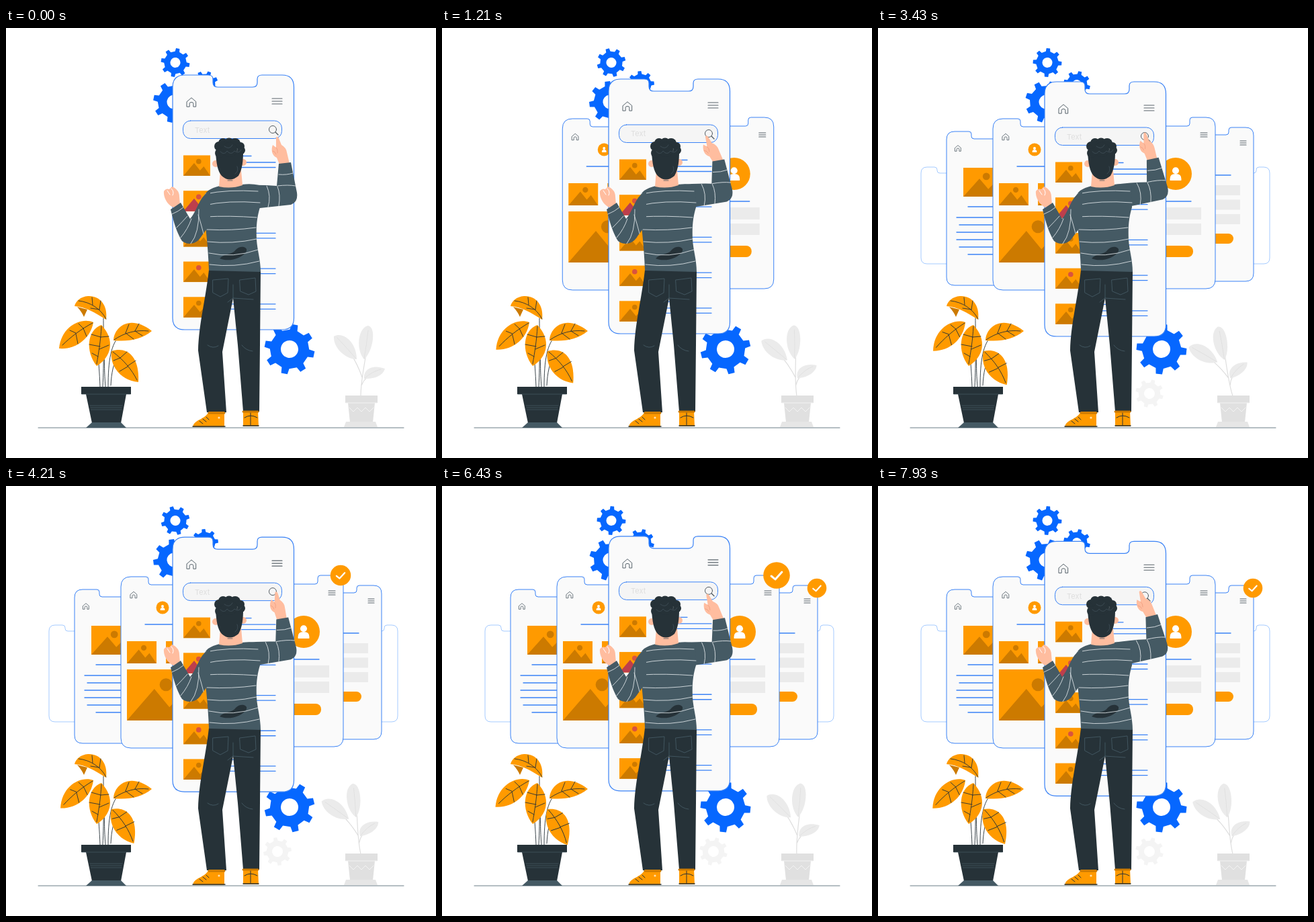
Recreate the animation shown at these times as an HTML page. Size 640 by 640 pixels, loop 8000 ms.

```html
<!DOCTYPE html>
<html lang="en">
<head>
<meta charset="utf-8">
<title>App design</title>
<style>
  html, body { margin: 0; width: 100%; height: 100%; overflow: hidden; background: #fff; }
  svg { display: block; width: 100vw; height: 100vh; }
</style>
</head>
<body>
<svg id="stage" viewBox="0 0 640 640" stroke-linecap="round" stroke-linejoin="round"></svg>
<script>
const LOOP = 8000;
const BLUE = '#0667ff', LINE = '#3a82f6', ORANGE = '#ff9a00', BROWN = '#cc7a00';
const DARK = '#263238', SLATE = '#455a64', SKIN = '#ffbd9f', PAPER = '#fafafa', GRAY = '#ebebeb';

const path = (d, fill = 'none', stroke = 'none', width = 1) =>
  `<path d="${d}" fill="${fill}" stroke="${stroke}" stroke-width="${width}"/>`;
const rect = (x, y, w, h, fill, r = 0, stroke = 'none') =>
  `<rect x="${x}" y="${y}" width="${w}" height="${h}" rx="${r}" fill="${fill}" stroke="${stroke}"/>`;
const circle = (x, y, r, fill, stroke = 'none') =>
  `<circle cx="${x}" cy="${y}" r="${r}" fill="${fill}" stroke="${stroke}"/>`;
const group = (id, ...parts) => `<g id="${id}">${parts.join('')}</g>`;
const rule = (x1, x2, y) => path(`M${x1} ${y}H${x2}`, 'none', LINE, 1.3);

function gear(id, x, y, r, fill, hole) {
  const points = [];
  for (let i = 0; i < 8; i++) {
    for (const [turn, reach] of [[-.25, .78], [-.16, 1], [.16, 1], [.25, .78]]) {
      const a = (i + turn) * Math.PI / 4;
      points.push(`${(Math.cos(a) * r * reach).toFixed(2)} ${(Math.sin(a) * r * reach).toFixed(2)}`);
    }
  }
  const ring = `M${hole} 0A${hole} ${hole} 0 1 0 ${-hole} 0A${hole} ${hole} 0 1 0 ${hole} 0Z`;
  return `<g transform="translate(${x} ${y})"><path id="${id}" fill-rule="evenodd" fill="${fill}" d="M${points.join('L')}Z${ring}"/></g>`;
}

function picture(x, y, w, h, hill = BROWN, sun = BROWN) {
  const at = (u, v) => `${x + w * u} ${y + h * v}`;
  return rect(x, y, w, h, ORANGE) +
    path(`M${at(0, 1)}L${at(.4, .38)}L${at(.62, .74)}L${at(.76, .54)}L${at(1, 1)}Z`, hill) +
    circle(x + w * .57, y + h * .3, h * .125, sun);
}

const house = (x, y, k) => path(
  `M${x - 7 * k} ${y - k}L${x} ${y - 7 * k}L${x + 7 * k} ${y - k}V${y + 7 * k}H${x + 3 * k}v${-5 * k}q0 ${-2 * k} ${-3 * k} ${-2 * k}t${-3 * k} ${2 * k}v${5 * k}H${x - 7 * k}Z`,
  'none', '#546068', .5 + .5 * k);
const menu = (x, y, w, gap) => path([-gap, 0, gap].map(d => `M${x} ${y + d}h${w}`).join(''), 'none', '#59636a', 1.1);

const avatar = (x, y, r) => circle(x, y, r, ORANGE) + circle(x, y - r * .2, r * .21, '#fff') +
  path(`M${x - r * .35} ${y + r * .42}v${-r * .12}q0 ${-r * .3} ${r * .35} ${-r * .3}t${r * .35} ${r * .3}v${r * .12}Z`, '#fff');

// Half-hidden screen: side is -1 for left, 1 for right.
function screen(side, edge, top, bottom, r, wall, drop, inner, fill = PAPER, stroke = LINE) {
  const c = 4 * side, rs = r * side;
  return path(`M${inner} ${top + drop}H${wall - c}q${c} 0 ${c} -4v${8 - drop}q0 -4 ${c} -4H${edge - rs}q${rs} 0 ${rs} ${r}V${bottom - r}q0 ${r} ${-rs} ${r}H${inner}`, fill, stroke);
}

function badge(id, x, y, r) {
  const k = r / 20;
  return `<g transform="translate(${x} ${y})">` + group(id, circle(0, 0, r, ORANGE),
    path(`M${-8 * k} ${k}l${6 * k} ${5 * k}l${10 * k} ${-11 * k}`, 'none', '#fff', 3 * k)) + '</g>';
}

const outerScreens =
  group('outerL', screen(-1, 64, 207, 351, 9, 88, 9, 200, '#fff', '#a5cbff')) +
  group('outerR', screen(1, 583, 207, 351, 9, 563, 9, 440, '#fff', '#a5cbff'));

const middleScreens =
  group('middleL', screen(-1, 102, 154, 383, 12, 139, 11, 270), house(119, 179, .62),
    picture(127, 208, 60, 43),
    rule(134, 240, 266), ...[282, 293, 304, 315, 326].map((y, i) => rule(i % 3 == 1 ? 121 : 117, 240, y)), rule(134, 240, 337)) +
  group('middleR', screen(1, 559, 148, 377, 12, 522, 11, 400), menu(539, 171, 9, 3),
    rule(420, 525, 219), ...[234, 255.5, 277].map(y => rect(440, y, 99, 15, GRAY)),
    rect(440, 306, 89, 15, ORANGE, 7.5));

const innerScreens =
  group('innerL', screen(-1, 171, 135, 390, 15, 212, 12, 320), house(190, 162, .68),
    avatar(233, 181, 9.5), rule(207, 260, 206),
    picture(180, 231, 44, 33), picture(238, 231, 44, 33), picture(180, 273, 102, 76)) +
  group('innerR', screen(1, 502, 133, 388, 14, 464, 13, 360), menu(480, 159, 10, 3),
    avatar(443, 217, 24), rule(390, 466, 258),
    rect(380, 267, 101, 18, GRAY), rect(380, 291, 101, 17, GRAY), rect(380, 324, 89, 17, ORANGE, 8));

const rows = [0, 1, 2, 3, 4].map(i => {
  const y = 189.5 + i * 52.7;
  return picture(264, y, 40, 30.5, i == 1 ? '#bd3f4c' : BROWN, i == 1 || i == 3 ? '#d9533f' : BROWN) +
    rule(320, 365, y + 1) + rule(320, 401, y + 10.5) + rule(320, 401, y + 18);
}).join('');

const phone = group('phone',
  path('M266 70H301q7 0 7 6v5q0 7 7 7H367q7 0 7 -7v-5q0 -6 7 -6H411q17.500 0 17.500 18V432q0 17 -17.500 17H266q-18 0 -18 -17V88q0 -18 18 -18Z', PAPER, LINE, 1.2),
  house(276, 110.500, .95), menu(396, 109, 15, 4),
  rect(263.5, 138, 147, 26.5, '#f5f5f5', 11, LINE),
  '<text x="281" y="155.500" font-family="Inter, Open Sans, sans-serif" font-size="11" fill="#dedede">Text</text>',
  circle(397, 151, 5.5, 'none', '#555e64'), path('M401 155l4 4', 'none', '#555e64', 1.4), rows);

const leaf = (d, veins, id = '') => group(id, path(d, ORANGE), path(veins, 'none', DARK, .9));
const plant =
  path('M140 534C139 510 138 500 137 485M144 534C146 500 145 450 145 432M148 534C146 510 147 500 146 487M152 534C152 495 156 470 170 457M156 532C157 512 160 500 166 488', 'none', DARK, .9) +
  leaf('M149 434C152 412 139 398 122 399C111 400 104 406 102 414C120 415 132 424 149 434Z', 'M149 433C141 418 126 408 108 406M139 419L141 406M129 412L128 401M139 419L126 417') +
  path('M106 415L121 419L116 430Q113 423 106 415Z', BROWN) +
  leaf('M130 438C112 430 82 444 79 477C104 479 126 462 130 438Z', 'M129 439C112 448 96 460 84 472M115 447L108 440M104 454L95 450M115 447L120 459M104 455L107 470', 'leafLeft') +
  leaf('M142 442C120 450 118 482 135 503C157 490 163 464 142 442Z', 'M142 444C141 465 138 482 135 500M141 460L127 456M140 474L124 471M141 460L153 459M139 478L153 472M137 489L128 484') +
  leaf('M160 465C160 448 182 424 217 451C201 464 182 467 160 465Z', 'M161 464C177 453 194 449 212 451M178 454L183 441M192 451L198 440M178 454L190 463M192 451L203 458') +
  leaf('M157 481C181 473 199 490 197 527C172 525 154 504 157 481Z', 'M159 482C175 494 187 508 195 524M170 491L180 482M181 503L193 495M170 491L160 495M181 504L169 511', 'leafLow') +
  path('M112 534H186V545H112ZM119 545H179L171 588H128Z', DARK) +
  path('M128 587H171L179 595H119Z', SLATE) +
  path('M113 545H185M125 562H173M126 565H172M126 568H172', 'none', SLATE, .7);

const palePlant =
  group('pale', path('M528 548C528 525 533 505 537 478M530 520C524 502 516 488 507 476M529 532C533 522 540 516 550 512', 'none', '#dedede', 1.2),
    path('M533 493C520 478 524 446 539 443C552 446 546 482 533 493ZM522 493C505 493 487 476 488 459C502 451 522 468 522 493ZM533 522C531 508 546 500 564 507C562 517 548 523 533 522Z', GRAY),
    path('M533 492Q537 470 539 450M521 492Q507 476 493 461M534 521Q545 511 558 508', 'none', '#dfdfdf', .8)) +
  path('M505 547H553V558H505ZM509 558H549L546 587H512Z', '#e0e0e0') +
  path('M506 586H550L553 594H503Z', '#e6e6e6') +
  path('M506 558H552M511 565l6 6l6 -6l6 6l6 -6l6 6l6 -6', 'none', '#f3f3f3');

const STRIPE = '#d9dfe2';
const hand = group('hand',
  path('M407 203L403 193C396 190 394 182 397 174L402 178L402 163Q404 160 406 164L410 174Q417 178 418 185L422 202Z', SKIN),
  path('M402 178Q405 181 404 186M397 183Q401 184 402 188', 'none', '#ee997d', .7));
const rightArm = group('arm', hand,
  path('M352 234Q380 233 403 235L406 202L424 200L433 245Q435 259 424 263L378 268L352 270Z', SLATE),
  path('M406 218Q418 219 427 216M404 235Q420 233 431 235M404 236Q409 248 406 265M388 235Q395 250 390 267', 'none', STRIPE, .9));

const leftArm =
  path('M249 267C240 263 234 252 235 243Q238 238 243 240L247 236L251 238Q258 243 258 251L259 263Z', SKIN) +
  path('M246 239Q251 244 248 249M240 242L244 248', 'none', '#fff', 1) +
  path('M304 243C287 250 286 270 274 284L260 260L245 270C250 291 255 306 262 317C270 324 283 321 288 314L304 292Z', SLATE) +
  path('M247 277Q257 273 264 267M254 297Q262 289 270 280M260 312Q271 299 276 284M275 321Q288 305 287 270M294 306Q290 290 286 278', 'none', STRIPE, .9);

const torso =
  path('M318 235C302 239 292 245 294 262C296 291 301 324 302 361L379 363C379 345 374 331 373 315C372 294 374 280 378 267L377 234Q365 231 351 233Z', SLATE) +
  path('M318 343C325 335 337 338 342 330C348 323 360 325 358 332C352 343 331 349 318 343Z', DARK) +
  path('M297 247Q330 240 375 243M295 264Q330 256 378 260M296 281Q333 279 373 282M299 300Q336 302 372 297M300 318Q337 322 373 314M302 335Q338 343 375 330M303 352Q340 357 377 347', 'none', STRIPE, .9);

const legs =
  path('M302 360L379 362L378 470L377 571H353L345 472L338 402L322 482L328 572H299L286 480C287 440 297 405 302 360Z', DARK) +
  path('M308 375L331 373L330 394L319 400L308 394ZM348 375L371 372L372 392L361 397L349 392ZM338 382V402M338 402L330 408M338 402L368 404M300 472Q308 478 316 473M351 472Q357 480 367 481', 'none', SLATE, .9);

const shoes =
  path('M278 594C280 582 295 584 302 571H325V594ZM353 570H375L376 593H353Z', ORANGE) +
  path('M278 593H326M353 592H376', 'none', DARK, 1.5) +
  path('M302 573H325M353 571H375', 'none', BROWN, 3) +
  path('M288 585l5 4M293 582l5 4M298 579l4 4M364 573V591M355 580Q364 574 374 580', 'none', DARK, 1) +
  circle(317, 580, 1.6, '#ffe0b0');

const head =
  path('M319 212H350L352 234Q335 240 317 236Z', SKIN) +
  circle(312, 202, 5, SKIN) + circle(353, 200, 5, SKIN) +
  path('M312 184C313 202 315 213 321 220Q333 231 346 220C352 210 353 197 353 183Z', DARK) +
  [[317, 176, 7], [323, 171, 7], [332, 171, 7.5], [341, 172, 8], [349, 176, 6], [350, 182, 6], [333, 181, 11], [318, 186, 7]]
    .map(c => circle(...c, DARK)).join('') +
  path('M319 184Q325 190 329 183Q335 190 340 183Q347 188 350 181M325 176Q333 182 337 174M344 206Q347 213 341 217M330 227H337', 'none', '#405059', .8);

document.getElementById('stage').innerHTML = [
  gear('gearPale', 404, 544, 21, '#f4f4f4', 8),
  gear('gearTop', 252, 51.5, 21.5, BLUE, 7.5),
  gear('gearLeft', 250, 110, 31, BLUE, 10.5),
  gear('gearNotch', 296, 84, 20, BLUE, 7),
  gear('gearLow', 422, 478, 37.5, BLUE, 13),
  outerScreens, middleScreens, innerScreens, phone,
  badge('checkBig', 498, 133, 19.8), badge('checkSmall', 558, 152, 14.3),
  path('M48 595H592', 'none', '#6b7d86', 1), plant, palePlant,
  legs, shoes, rightArm, torso, leftArm, head
].join('');

const $ = id => document.getElementById(id);
const move = (id, value) => $(id).setAttribute('transform', value);
const spin = (id, deg, x = 0, y = 0) => move(id, `rotate(${deg} ${x} ${y})`);
const ramp = (t, from, to) => Math.min(1, Math.max(0, (t - from) / (to - from)));
// Linear swing: 0 at the start, 1 at half the period.
const swing = (t, period) => 1 - Math.abs(1 - 2 * (t / period % 1));

function slide(name, t, from, to, reach) {
  const u = ramp(t, from, to), offset = reach * (1 - u);
  for (const [side, dir] of [['L', 1], ['R', -1]]) {
    move(name + side, `translate(${dir * offset} 0)`);
    $(name + side).setAttribute('opacity', Math.min(1, u * 1.7));
  }
}

function draw(t) {
  const bob = swing(t, 5450), sway = swing(t, 6000);
  move('phone', `translate(0 ${13.5 * bob})`);
  spin('arm', -7.5 * bob, 345, 262);
  spin('hand', -7 * Math.sin(t / 5450 * 2 * Math.PI), 414, 200);
  spin('pale', -21 * sway, 527, 548);
  spin('leafLeft', -5 * sway, 130, 438);
  spin('leafLow', 12 * swing(t, 13000), 157, 481);

  const turn = t * .09;
  spin('gearTop', 10 + turn);
  spin('gearLeft', 12 - turn);
  spin('gearNotch', 20 + turn);
  spin('gearLow', 12 + turn);
  spin('gearPale', 10 - turn);
  $('gearPale').setAttribute('opacity', ramp(t, 2600, 3400));

  slide('inner', t, 100, 1500, 40);
  slide('middle', t, 1300, 2700, 40);
  slide('outer', t, 2550, 3400, 30);

  const leave = ramp(t, 7250, 7920);
  move('checkBig', `scale(${ramp(t, 3440, 4440) * (1 - leave * leave)})`);
  move('checkSmall', `scale(${ramp(t, 4300, 5300)})`);
}

const start = performance.now();
function tick() {
  draw((performance.now() - start) % LOOP);
  requestAnimationFrame(tick);
}
tick();
</script>
</body>
</html>
```
